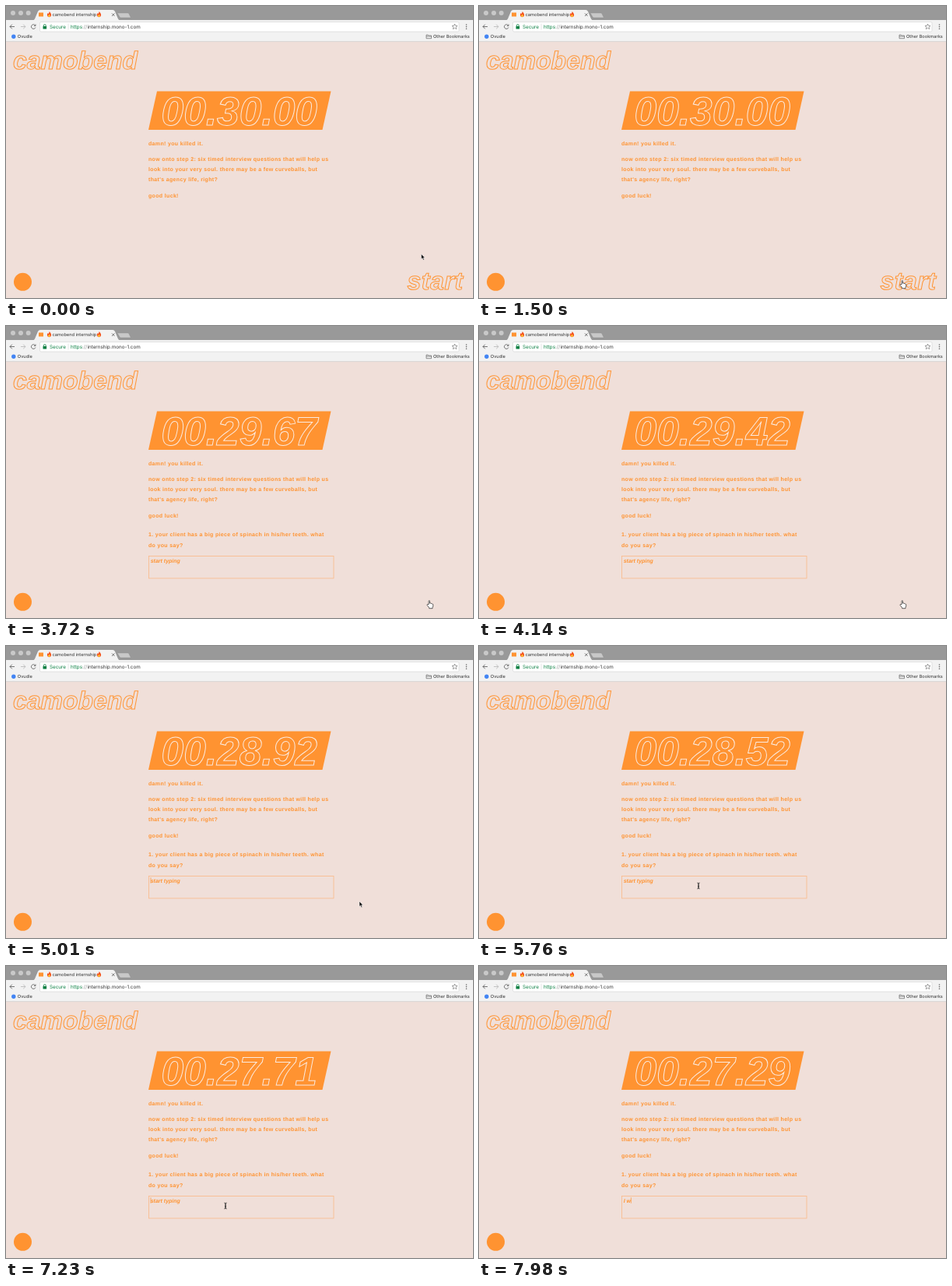
Recreate the animation shown at these times as an HTML page. Size 600 by 375 pixels, loop 8 s.

```html
<!DOCTYPE html>
<html lang="en">
<head>
<meta charset="utf-8">
<title>camobend internship</title>
<style>
html, body { margin: 0; width: 100%; height: 100%; overflow: hidden; background: #f0dfd9; }
svg { display: block; width: 600px; height: 375px; text-rendering: geometricPrecision; }
.ui { font: 5.7px Inter, Roboto, sans-serif; fill: #333; }
.url { font-size: 6.3px; }
.copy { font: bold 7px "Liberation Sans", Arial, sans-serif; letter-spacing: .34px; fill: #ff9331; }
.input { font-style: italic; letter-spacing: 0; }
.outline { font: italic bold 32px "Liberation Sans", Arial, sans-serif; fill: none; stroke: #ff9331; stroke-width: 1; }
#timer { font-size: 51.5px; stroke: #fbeadf; }
.icon { fill: none; stroke: #666; stroke-width: .9; }
</style>
</head>
<body>
<svg viewBox="0 0 600 375">
  <defs>
    <g id="flame">
      <path d="M.3-6C1.6-4.4 2.6-3.2 2.6-1.4 2.6.4 1.4 1.2 0 1.2S-2.6.3-2.6-1.4C-2.6-2.6-2-3.3-1.7-4L-1-3C-.3-3.8 0-4.7.3-6Z" fill="#f4511e"/>
      <path d="M0-2.6C1-1.6 1.4-1 1.4-.3A1.4 1.4 0 0 1-1.4-.3C-1.4-1-.6-1.5 0-2.6Z" fill="#ffc533"/>
    </g>
  </defs>

  <rect width="600" height="375" fill="#f0dfd9"/>

  <!-- Browser chrome -->
  <rect width="600" height="19" fill="#999"/>
  <g fill="#c9c9c9">
    <circle cx="9" cy="9" r="3"/><circle cx="19" cy="9" r="3"/><circle cx="28.7" cy="9" r="3"/>
  </g>
  <path d="M143 9h13.500q1 0 1.500 1l2.500 5h-13q-1 0-1.500-1z" fill="#c8c8c8" stroke="#888" stroke-width=".4"/>
  <rect y="18" width="600" height="28" fill="#f2f2f2"/>
  <path d="M34 18.500q2 0 3-2l4-9.500q1-2 3-2h93q2 0 3 2l4 9.500q1 2 3 2z" fill="#f2f2f2"/>
  <rect x="42" y="8.500" width="6" height="5" fill="#ff9331"/>
  <use href="#flame" x="55.500" y="13"/>
  <text class="ui" x="59.500" y="13.200">camobend internship</text>
  <use href="#flame" x="119.500" y="13"/>
  <path class="icon" d="M136 9.500l3.500 3.500m0-3.500l-3.500 3.500"/>
  <g class="icon">
    <path d="M11 26.500H5m2.800-2.800L5 26.500l2.800 2.800"/>
    <path d="M19 26.500h6m-2.800-2.800l2.800 2.800-2.800 2.800" stroke="#bbb"/>
    <path d="M37.600 25A2.800 2.800 0 1 0 37.900 27.500M38 23.500v2h-2"/>
  </g>
  <rect x="43.500" y="20.500" width="538.500" height="12.500" rx="1.500" fill="#fff" stroke="#d2d2d2" stroke-width=".6"/>
  <rect x="47.500" y="26" width="4.600" height="3.500" fill="#0b8043"/>
  <path d="M48.400 26v-1a1.400 1.400 0 0 1 2.800 0v1" fill="none" stroke="#0b8043" stroke-width=".8"/>
  <text class="ui url" x="56" y="28.900" fill="#0b8043" style="fill:#0b8043">Secure</text>
  <path d="M80 22.500v8" stroke="#d5d5d5" stroke-width=".6"/>
  <text class="ui url" x="83" y="28.900"><tspan style="fill:#0b8043">https</tspan><tspan style="fill:#888">://</tspan>internship.mono-1.com</text>
  <path d="M576.500 23l1 2.300 2.500.2-1.900 1.600.6 2.500-2.200-1.300-2.200 1.300.6-2.500-1.900-1.600 2.500-.2z" class="icon" style="stroke-width:.6"/>
  <g fill="#666">
    <circle cx="591.500" cy="24" r=".8"/><circle cx="591.500" cy="26.600" r=".8"/><circle cx="591.500" cy="29.200" r=".8"/>
  </g>
  <circle cx="9.800" cy="39.300" r="2.700" fill="#4285f4"/>
  <text class="ui" x="14.800" y="41.400">Ovudle</text>
  <path d="M540 41.700v-4.600h2.200l.7.900h3.600v3.700zM540 39h6.500" class="icon" style="stroke-width:.7"/>
  <text class="ui" x="549" y="41.400">Other Bookmarks</text>
  <path d="M0 45.600h600" stroke="#cfcac8" stroke-width=".7"/>

  <!-- Page -->
  <text class="outline" x="9" y="80.500">camobend</text>
  <path d="M194 109.500H417.500L406.500 159H183z" fill="#ff9331"/>
  <text class="outline" id="timer" x="199.500" y="153"></text>
  <g class="copy">
    <text x="183" y="178.500">damn! you killed it.</text>
    <text x="183" y="199">now onto step 2: six timed interview questions that will help us</text>
    <text x="183" y="212.300">look into your very soul. there may be a few curveballs, but</text>
    <text x="183" y="225.400">that's agency life, right?</text>
    <text x="183" y="246">good luck!</text>
  </g>
  <g class="copy" id="question">
    <text x="183" y="270.400">1. your client has a big piece of spinach in his/her teeth. what</text>
    <text x="183" y="283.600">do you say?</text>
    <rect x="183.500" y="295.500" width="237.500" height="28.500" fill="none" stroke="#fbb988" stroke-width=".8"/>
    <text class="input" id="answer" x="185.700" y="303.600" xml:space="preserve"></text>
    <path id="caret" d="M0 297.300v7.400" stroke="#ff9331" stroke-width=".7"/>
  </g>
  <circle cx="21.500" cy="354.300" r="11.500" fill="#ff9331"/>
  <text class="outline" id="start" x="515.500" y="364" letter-spacing=".5">start</text>

  <!-- Pointers, each drawn around its hot spot -->
  <g id="pointer">
    <path id="arrow" d="M0 0v6.500l1.500-1.300 1.100 2.500 1.200-.5-1.100-2.400h2z" fill="#111" stroke="#fff" stroke-width=".5"/>
    <path id="hand" d="M-.9 5V1q0-.9.7-.9T.5 1v2.600q1.200-.4 1.600.3 1.100-.3 1.400.5 1.200-.1 1.200 1v2L4 9.200v1H-.3V9.400L-2.900 6q-.4-1 .6-1.100z" fill="#fff" stroke="#222" stroke-width=".7"/>
    <path id="beam" d="M-1.600-3.800q1.600 0 1.600 1v5.600q0 1-1.600 1M1.600-3.800q-1.600 0-1.600 1v5.600q0 1 1.600 1M-.8 1h1.600" fill="none" stroke="#222" stroke-width=".8"/>
  </g>
</svg>
<script>
const LOOP = 8000, CLICK = 3150;
const byId = id => document.getElementById(id);
const clamp = x => Math.min(1, Math.max(0, x));
const show = (id, visible) => byId(id).setAttribute('visibility', visible ? 'visible' : 'hidden');
const progress = (t, from, to) => clamp((t - from) / (to - from));

// Keys are [time, ...values]; values are joined linearly.
function track(t, keys) {
  const next = keys.findIndex(k => k[0] > t);
  if (next === 0) return keys[0].slice(1);
  if (next < 0) return keys[keys.length - 1].slice(1);
  const a = keys[next - 1], b = keys[next], p = progress(t, a[0], b[0]);
  return a.slice(1).map((v, i) => v + (b[i + 1] - v) * p);
}

const countdown = [[CLICK, 3000], [4140, 2942], [5010, 2892], [6480, 2813], [7980, 2729], [LOOP, 2728]];
const route = [
  [90, 533.5, 318.5], [300, 537, 328], [540, 542, 344], [780, 544, 352.500],
  [4840, 544, 352.500], [4920, 514, 345], [5010, 454.500, 328],
  [5190, 363, 315], [5370, 304, 309], [5580, 282, 308]
];
const keystrokes = [[7440, 'I'], [7620, 'I '], [7800, 'I w']];

function draw(t) {
  const left = Math.round(track(t, countdown)[0]);
  const pad = n => String(n).padStart(2, '0');
  byId('timer').textContent = `00.${pad(Math.floor(left / 100))}.${pad(left % 100)}`;

  byId('start').setAttribute('opacity', 1 - progress(t, 3180, 3600));
  byId('question').setAttribute('opacity', progress(t, 3210, 3720));

  const typed = keystrokes.filter(k => k[0] <= t).pop();
  const answer = byId('answer');
  answer.textContent = typed ? typed[1] : 'start typing';
  const blinkOn = t >= 4700 && (t - 4700) % 1900 < 950;
  show('caret', typed || blinkOn);
  const caretX = 186 + (typed ? answer.getComputedTextLength() : 0);
  byId('caret').setAttribute('transform', `translate(${caretX})`);

  const [x, y] = track(t, route);
  byId('pointer').setAttribute('transform', `translate(${x} ${y})`);
  const shape = typed ? '' : t < 4860 && y > 341 ? 'hand' : t > 5100 && x < 421 && y < 324 ? 'beam' : 'arrow';
  for (const id of ['arrow', 'hand', 'beam']) show(id, id === shape);
}

const begin = performance.now();
function frame() {
  draw((performance.now() - begin) % LOOP);
  requestAnimationFrame(frame);
}
frame();
</script>
</body>
</html>
```
